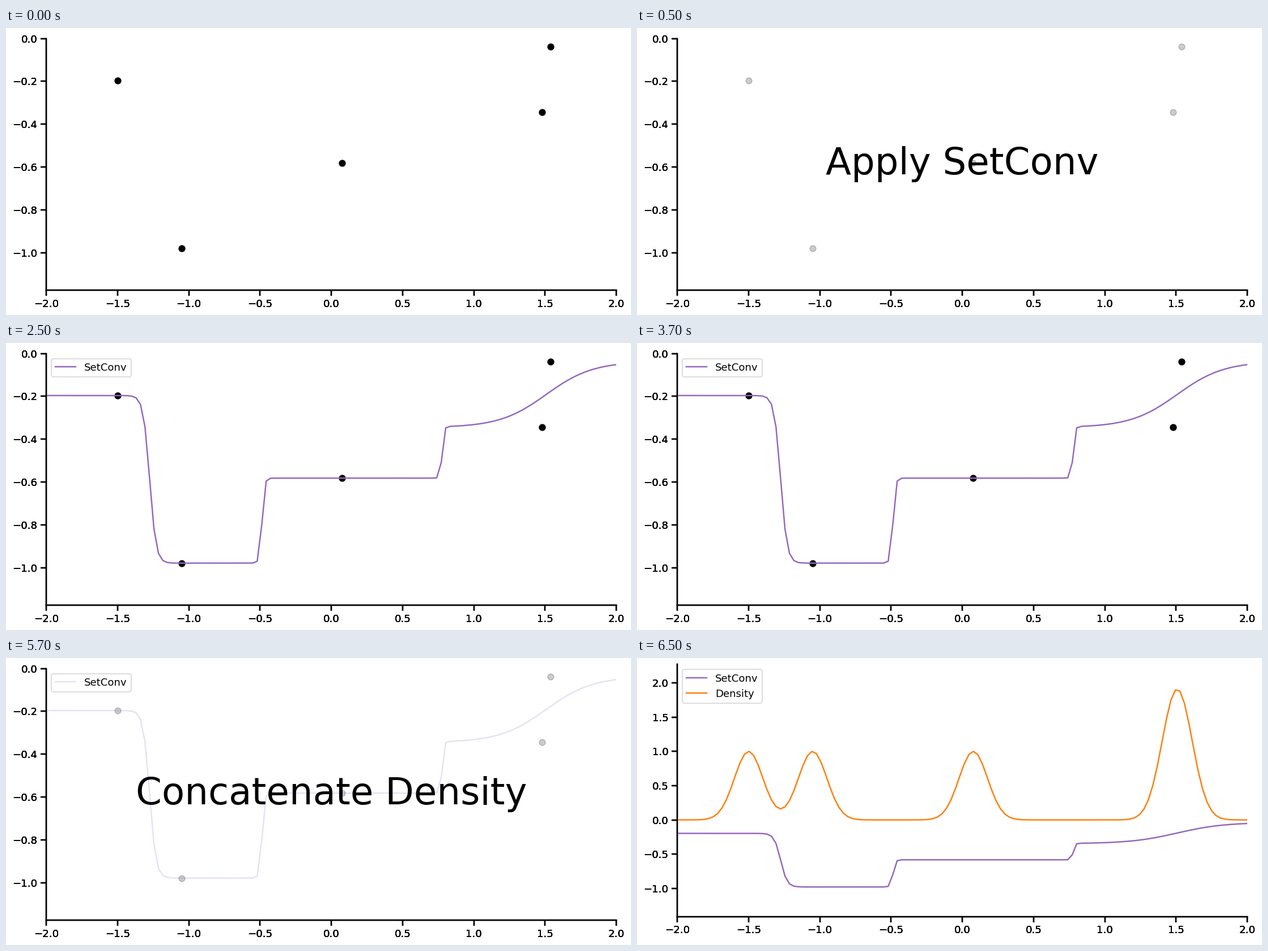
A matplotlib script that plays this animation: 1103x508 px, repeating every 8 s.

```python
import matplotlib.pyplot as plt
import numpy as np
from matplotlib.animation import FuncAnimation

WIDTH, HEIGHT, DPI = 1103, 508, 128
PT = 0.925            # scale of all point sizes
LAYERS = 4            # axes are overdrawn, which gives firm ticks and labels
INTERVAL = 500        # ms
PURPLE, ORANGE = "#9467bd", "#ff7f0e"

plt.rcParams.update({
    "font.family": "DejaVu Sans",
    "font.size": 11 * PT,
    "xtick.labelsize": 11 * PT,
    "ytick.labelsize": 11 * PT,
    "legend.fontsize": 11 * PT,
    "lines.linewidth": 1.5 * PT,
    "patch.linewidth": 1.0 * PT,
    "axes.linewidth": 1.35 * PT,
    "xtick.major.width": 1.35 * PT,
    "ytick.major.width": 1.35 * PT,
    "xtick.major.size": 6 * PT,
    "ytick.major.size": 6 * PT,
    "xtick.major.pad": 3.5 * PT,
    "ytick.major.pad": 3.5 * PT,
    "axes.spines.top": False,
    "axes.spines.right": False,
})

# Context points and their smoothed signal
px = np.array([-1.499, -1.0497, 0.0775, 1.478, 1.539])
py = np.array([-0.1963, -0.978, -0.5815, -0.345, -0.0375])
grid = np.linspace(-2, 2, 128)
weights = np.exp(-0.5 * ((grid[:, None] - px) / 0.1) ** 2)
density = weights.sum(axis=1)
signal = weights @ py / density

# (start in ms, scene options)
SCENES = [
    (0, dict(points=True)),
    (500, dict(points=True, title="Apply SetConv")),
    (2500, dict(points=True, curve=True)),
    (4500, dict(points=True, curve=True, title="Concatenate Density")),
    (6500, dict(curve=True, bumps=True)),
]

fig = plt.figure(figsize=(WIDTH / DPI, HEIGHT / DPI), dpi=DPI, facecolor="white")


def add_axes(top, bottom, ylim, yticks):
    """Place axes by pixel rows counted from the top of the stage."""
    left, right = 71, 1077
    ax = fig.add_axes([left / WIDTH, 1 - bottom / HEIGHT,
                       (right - left) / WIDTH, (bottom - top) / HEIGHT])
    ax.patch.set_visible(False)
    ax.set_xticks(np.linspace(-2, 2, 9))
    ax.set_yticks(yticks)
    ax.set_xlim(-2, 2)
    ax.set_ylim(ylim)
    return ax


def draw_scene(points=False, curve=False, bumps=False, title=None):
    fig.clear()
    if bumps:
        frame = (11.3, 457.6, (-1.409, 2.268), np.linspace(-1, 2, 7))
    else:
        frame = (18.5, 464, (-1.174, 0), np.linspace(-1, 0, 6))
    ax = [add_axes(*frame) for _ in range(LAYERS)][-1]

    alpha = 0.2 if title else 1
    if points:
        ax.scatter(px, py, s=42 * PT ** 2, color="black",
                   linewidths=PT, alpha=alpha)
    if curve:
        ax.plot(grid, signal, color=PURPLE, alpha=alpha, label="SetConv")
    if bumps:
        ax.plot(grid, density, color=ORANGE, label="Density")
    if curve:
        ax.legend(loc="upper left")
    if title:
        ax.text(0.5, 0.5, title, transform=ax.transAxes, fontsize=40 * PT,
                ha="center", va="center")


def update(i):
    now = i * INTERVAL
    scene = [options for start, options in SCENES if start <= now][-1]
    draw_scene(**scene)
    return []


anim = FuncAnimation(fig, update, frames=16, interval=INTERVAL,
                     repeat=True, repeat_delay=0, blit=False)
plt.show()
```
